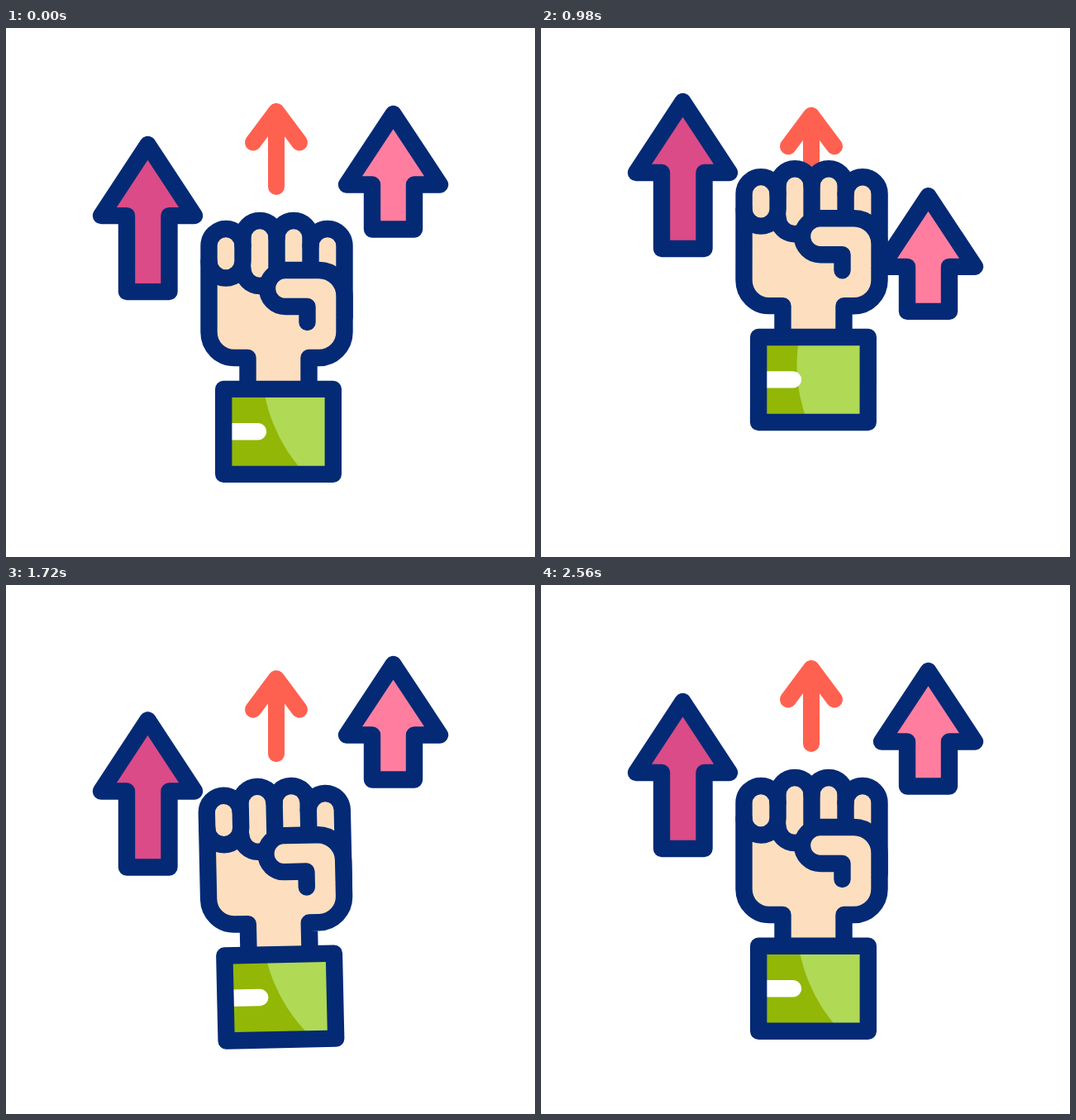
An HTML page that plays this animation: 640x640 px, repeating every 2820 ms.

```html
<!DOCTYPE html>
<html lang="en">
<head>
<meta charset="utf-8">
<title>Raised fist with arrows</title>
<style>
html, body { margin: 0; width: 100%; height: 100%; overflow: hidden; background: #fff; }
svg { display: block; width: 100vw; height: 100vh; }
.line { stroke: #042a75; stroke-width: 20.4; stroke-linecap: round; stroke-linejoin: round; fill: none; }
.skin { fill: #fddfbf; }
</style>
</head>
<body>
<svg viewBox="0 0 640 640">
  <clipPath id="cuff"><rect class="fist" x="263" y="437" width="133" height="103"/></clipPath>

  <path id="left" class="line" style="fill:#db4b87"
    d="M171.5 141 L228 227 H197.5 V319 H146 V227 H115 Z"/>
  <path id="middle" fill="none" stroke="#ff6150" stroke-width="20" stroke-linecap="round" stroke-linejoin="round"
    d="M327 192 V101 M299 138.5 L327 101 L355 138.5"/>
  <path id="right" class="line" style="fill:#ff7e9f"
    d="M468.5 104 L525 189.5 H494 V243.5 H443 V189.5 H412 Z"/>

  <g class="fist">
    <path class="line skin" d="M292.5 437 V399 H276 A30.5 31 0 0 1 245.5 368 V263.5
      a20.5 20.5 0 0 1 41 0 V253.5 a20.5 20.5 0 0 1 41 0 a20.5 20.5 0 0 1 41 0 V263.5
      a20.5 20.5 0 0 1 41 0 V368 A31 31 0 0 1 378.5 399 H366.5 V437"/>
    <path class="line" d="M245.5 282 a20.5 20.5 0 0 0 41 0 V263
      M286.5 291.5 a20.5 20.5 0 0 0 41 0 V253 M368.5 263 V293"/>
    <path class="line skin" d="M364.5 356 V337 H338 A22 22 0 0 1 338 293 H378.5 A31 31 0 0 1 409.5 324 V350"/>
    <rect x="263" y="437" width="133" height="103" fill="#92b706"/>
  </g>
  <g clip-path="url(#cuff)"><circle cx="502.5" cy="407" r="193" fill="#b0d955"/></g>
  <g class="fist">
    <path fill="#fff" d="M270 478 H305 a10 10 0 0 1 0 20.4 H270 Z"/>
    <rect class="line" x="263.2" y="436.8" width="132.6" height="103"/>
  </g>
</svg>
<script>
const LOOP = 2820, LAG = 120;

function bezier(x1, y1, x2, y2) {
  const axis = (a, b, s) => 3 * a * s * (1 - s) ** 2 + 3 * b * s * s * (1 - s) + s ** 3;
  return x => {
    let lo = 0, hi = 1;
    for (let i = 0; i < 20; i++) {
      const mid = (lo + hi) / 2;
      if (axis(x1, x2, mid) < x) lo = mid; else hi = mid;
    }
    return axis(y1, y2, lo);
  };
}
const ease = bezier(.25, .1, .25, 1);
const sine = bezier(.37, 0, .63, 1);
const cubic = bezier(.65, 0, .35, 1);
const settle = bezier(.45, 0, .2, 1);

// Each move eases from the last value to `to` between two times
const swing = moves => t => {
  let value = 0;
  for (const [from, until, to, easing] of moves) {
    if (t <= from) break;
    value += (to - value) * easing(Math.min(1, (t - from) / (until - from)));
  }
  return value;
};

const arrowY = swing([
  [0, 600, 117, ease],
  [610, 1065, -58, cubic],
  [1110, 1755, 23, sine],
  [1755, 2130, -12, sine],
  [2130, 2320, 0, sine]
]);
const fistY = swing([
  [0, 570, 75.5, ease],
  [570, 1060, -65, settle],
  [1160, 1575, 27.5, sine],
  [1575, 1930, -20, sine],
  [1930, 2480, 0, sine]
]);
const fistTurn = swing([
  [0, 700, -7.4, sine],
  [700, 1170, 4, sine],
  [1170, 1600, -1.6, sine],
  [1600, 2000, 0, sine]
]);

const arrows = ['left', 'middle', 'right'].map(id => document.getElementById(id));
const fist = document.querySelectorAll('.fist');

function draw(t) {
  arrows.forEach((el, i) => el.setAttribute('transform', `translate(0 ${arrowY(t - i * LAG)})`));
  const pose = `translate(0 ${fistY(t)}) rotate(${fistTurn(t)} 327.5 386)`;
  fist.forEach(el => el.setAttribute('transform', pose));
}

const start = performance.now();
function tick() {
  draw((performance.now() - start) % LOOP);
  requestAnimationFrame(tick);
}
tick();
</script>
</body>
</html>
```
